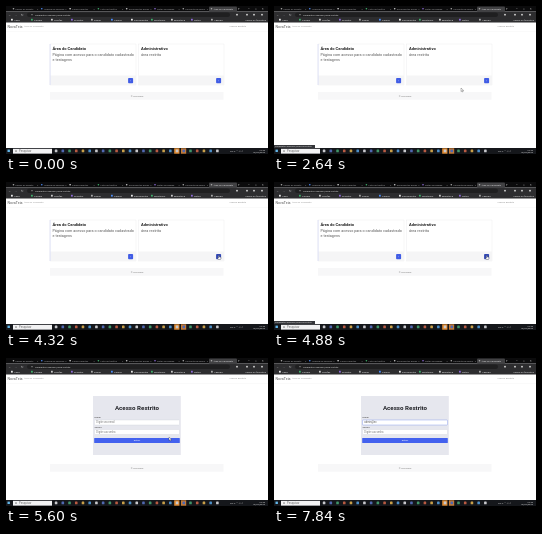
These frames come from a looping animation (262x148 px, 8 s). An HTML page:

```html
<!DOCTYPE html>
<html lang="pt">
<meta charset="utf-8">
<style>
  html, body { margin: 0; width: 100%; height: 100%; overflow: hidden; background: #fff; }
  svg { display: block; width: 262px; height: 148px; font-family: Roboto, sans-serif; }
</style>
<svg id="stage" viewBox="0 0 262 148"></svg>
<script>
const LOOP = 8000;
const stage = document.getElementById('stage');

const rect = (x, y, w, h, fill, extra = '') =>
  `<rect x="${x}" y="${y}" width="${w}" height="${h}" fill="${fill}" ${extra}/>`;
const text = (x, y, size, fill, str, extra = '') =>
  `<text x="${x}" y="${y}" font-size="${size}" fill="${fill}" ${extra}>${str}</text>`;
const dot = (x, y, r, fill) => `<circle cx="${x}" cy="${y}" r="${r}" fill="${fill}"/>`;
const group = (id, body) => `<g id="${id}">${body}</g>`;
const bold = 'font-weight="700"', middle = 'text-anchor="middle"', end = 'text-anchor="end"';

function browser() {
  const hues = ['#a8a8a8', '#4c8bf5', '#e8e8e8', '#3fae6a', '#c9c9c9', '#8e6ad8'];
  const tabs = ['Painel do projeto', 'Agenda da semana', 'Cursos abertos', 'Lista de tarefas',
    'Documentos gerais', 'Notas da equipe', 'Consulta de dados'];
  const marks = ['Apps', 'Correio', 'Tarefas', 'Projetos', 'Painel', 'Cursos', 'Documentos',
    'Relatórios', 'Biblioteca', 'Notas', 'Agenda'];
  let out = rect(0, 0, 262, 5.5, '#0b0b0c') + rect(0, 5.5, 262, 11, '#2d2d2f');
  out += tabs.map((name, i) => dot(7.5 + i * 28.3, 2.8, .8, hues[i % 6]) +
    text(9.5 + i * 28.3, 3.6, 2.4, '#a5a5a7', name) +
    text(31 + i * 28.3, 3.6, 2.4, '#a5a5a7', '×')).join('');
  out += rect(203, .6, 28, 5.4, '#414143', 'rx="1"') + dot(205.5, 2.8, .8, '#aaa') +
    text(207.5, 3.6, 2.4, '#e4e4e6', 'Área do Candidato') + text(232, 3.9, 3, '#ccc', '+') +
    text(242, 3.6, 2.6, '#ccc', '–') + text(249, 3.6, 2.6, '#ccc', '□') + text(256, 3.6, 2.8, '#ccc', '×');
  out += text(2, 9.6, 3, '#d8d8d8', '←') + text(8, 9.6, 3, '#85868a', '→') + text(15, 9.6, 3, '#d8d8d8', '↻') +
    rect(21, 6.5, 203, 4.4, '#1f1f20', 'rx="2.2"') + dot(26, 8.7, .6, '#aaa') +
    text(29, 9.6, 2.4, '#ddd', 'candidatos.exemplo/area-restrita');
  out += [231, 241, 248, 256].map((x) => dot(x, 8.7, .9, '#d8d8d8')).join('');
  out += marks.map((name, i) => rect(5 + i * 20, 12.8, 1.8, 1.8, hues[(i + 2) % 6]) +
    text(8 + i * 20, 14.6, 2.5, '#eee', name)).join('');
  return out + text(260, 14.6, 2.5, '#eee', 'Todos os favoritos', end);
}

function taskbar() {
  const hues = ['#c8c8cc', '#4c8fc8', '#c99f48', '#b85a42', '#3f9468', '#5068b0'];
  let out = rect(0, 142, 262, 6, '#15171b') + rect(1.5, 143.6, 2.4, 2.4, '#62b6e8') +
    rect(7, 142.8, 39, 4.8, '#f2f2f3') + dot(10, 145.1, .8, '#777') + text(13, 146, 2.8, '#666', 'Pesquisar');
  out += rect(168.2, 142.3, 5.2, 5.4, '#e08a30') + rect(175, 142.3, 5.2, 5.4, '#c77a32');
  for (let i = 0; i < 25; i++)
    out += rect(48.8 + i * 6.72, 143.6, 2.6, 2.6, hues[i * 5 % 6], 'rx=".5"');
  return out + text(224, 146, 2.5, '#ddd', '28°C  ⌃  ▱  ♫') +
    text(259, 144.9, 2.3, '#eee', '15:42', end) + text(259, 147.2, 2.3, '#eee', '12/03/2024', end);
}

const header = text(1.5, 21.6, 3.6, '#555', 'NovaTeia') +
  text(18, 21.2, 2.4, '#999', 'Área do Candidato') +
  text(240, 21.2, 2.4, '#888', 'Acesso Restrito', end) +
  rect(0, 25, 262, .3, '#eee');

const footer = (y) => rect(44, y, 173.5, 7.7, '#f7f7f8') +
  text(131, y + 4.7, 2.4, '#777', '© NovaTeia', middle);

const card = (x, w, title, lines, id) =>
  rect(x, 38, w, 41, '#fff', 'stroke="#e5e5e8" stroke-width=".35"') +
  rect(x, 69.5, w, 9.5, '#f5f5f6') +
  text(x + 2.5, 44.1, 4.05, '#222', title, bold) +
  lines.map((line, i) => text(x + 2.5, 50 + i * 5, 3.75, '#555', line)).join('') +
  rect(x + w - 7.9, 72, 5, 5.2, '#405ce5', `id="${id}" rx=".8"`) +
  text(x + w - 5.4, 75.7, 3.2, '#dce2ff', '›', middle);

const field = (y, label, hint, id) => text(88.6, y - 2, 2.5, '#333', label) +
  rect(88.5, y, 85, 5, '#fff', `id="${id}Box" rx=".6" stroke="#cfd1d8" stroke-width=".35"`) +
  text(90.3, y + 3.4, 2.6, '#777', hint, `id="${id}Text"`);

stage.innerHTML = browser() + header +
  group('home',
    card(44, 86, 'Área do Candidato', ['Página com acesso para o candidato cadastrado', 'e testagens'], 'first') +
    card(132.5, 85.5, 'Administrativo', ['área restrita'], 'second') +
    rect(43.8, 38, .5, 41, '#c5cdf4') + footer(86)) +
  group('login', rect(87, 38, 87.8, 59, '#e6e7ee') +
    text(131, 52.2, 6.2, '#202126', 'Acesso Restrito', `${bold} ${middle}`) +
    field(62, 'Email', 'Digite seu email', 'email') + field(71.5, 'Senha', 'Digite sua senha', 'pass') +
    rect(88.2, 80, 85.6, 5, '#4361ee', 'rx=".6"') + text(131, 83.4, 2.5, '#fff', 'Entrar', middle) +
    rect(90.2, 63, .4, 3, '#333', 'id="caret"') + footer(106)) +
  taskbar() +
  group('status', rect(0, 139, 41, 3, '#35363a') +
    text(1, 141.4, 2.3, '#ddd', 'candidatos.exemplo/acesso-restrito')) +
  `<g id="pointer" fill="#fff" stroke="#222" stroke-width=".3">
    <path id="arrow" d="M0 0V3.6L.9 2.8 1.5 4 2.1 3.7 1.5 2.5H2.7Z"/>
    <path id="hand" d="M-.4 0H.3V1.4L1.9 1.8V3.2L1.4 4H-.5L-1.4 2.4-.9 2-.4 2.5Z"/></g>`;

const el = (id) => document.getElementById(id);
const show = (id, on) => el(id).setAttribute('display', on ? 'inline' : 'none');

// Pointer path: time, x, y
const path = [[0, 124.5, 73.2], [1520, 124.5, 73.2], [1600, 179, 82], [1840, 179, 82], [2160, 213, 74],
  [2400, 213, 74], [2640, 187, 82], [3040, 190, 84], [3680, 190, 84], [4080, 213, 73.5],
  [5280, 213, 73.5], [5600, 163, 79], [5920, 119, 73], [6240, 119, 73], [6480, 112, 64]];

function pointerAt(t) {
  const i = path.findIndex(([time]) => time > t);
  if (i < 0) return path[path.length - 1].slice(1);
  const [t0, x0, y0] = path[i - 1], [t1, x1, y1] = path[i];
  const p = (t - t0) / (t1 - t0), e = p * p * (3 - 2 * p);
  return [x0 + (x1 - x0) * e, y0 + (y1 - y0) * e];
}

function render(t) {
  const [x, y] = pointerAt(t);
  const login = t >= 5040, focus = t >= 6400;
  const over = (left) => !login && x > left && x < left + 6 && y > 71 && y < 78;
  const overSecond = over(210);
  show('home', !login);
  show('login', login);
  show('status', (t >= 2080 && t < 2800) || (t >= 4400 && t < 5360));
  el('second').setAttribute('fill', overSecond ? '#3046b4' : '#405ce5');
  show('pointer', t >= 1520 && t < 6480);
  show('hand', overSecond || over(121.5));
  show('arrow', !overSecond && !over(121.5));
  el('pointer').setAttribute('transform', `translate(${x} ${y})`);
  el('emailBox').setAttribute('stroke', focus ? '#6680e8' : '#cfd1d8');
  const typed = 'admin@ex'.slice(0, t < 7520 ? 3 : 4 + Math.floor((t - 7520) / 80));
  el('emailText').textContent = t < 6960 ? 'Digite seu email' : typed;
  el('emailText').setAttribute('fill', t < 6960 ? '#777' : '#555');
  show('caret', focus && t < 6720);
}

function tick() {
  render(performance.now() % LOOP);
  requestAnimationFrame(tick);
}
tick();
</script>
</html>
```
